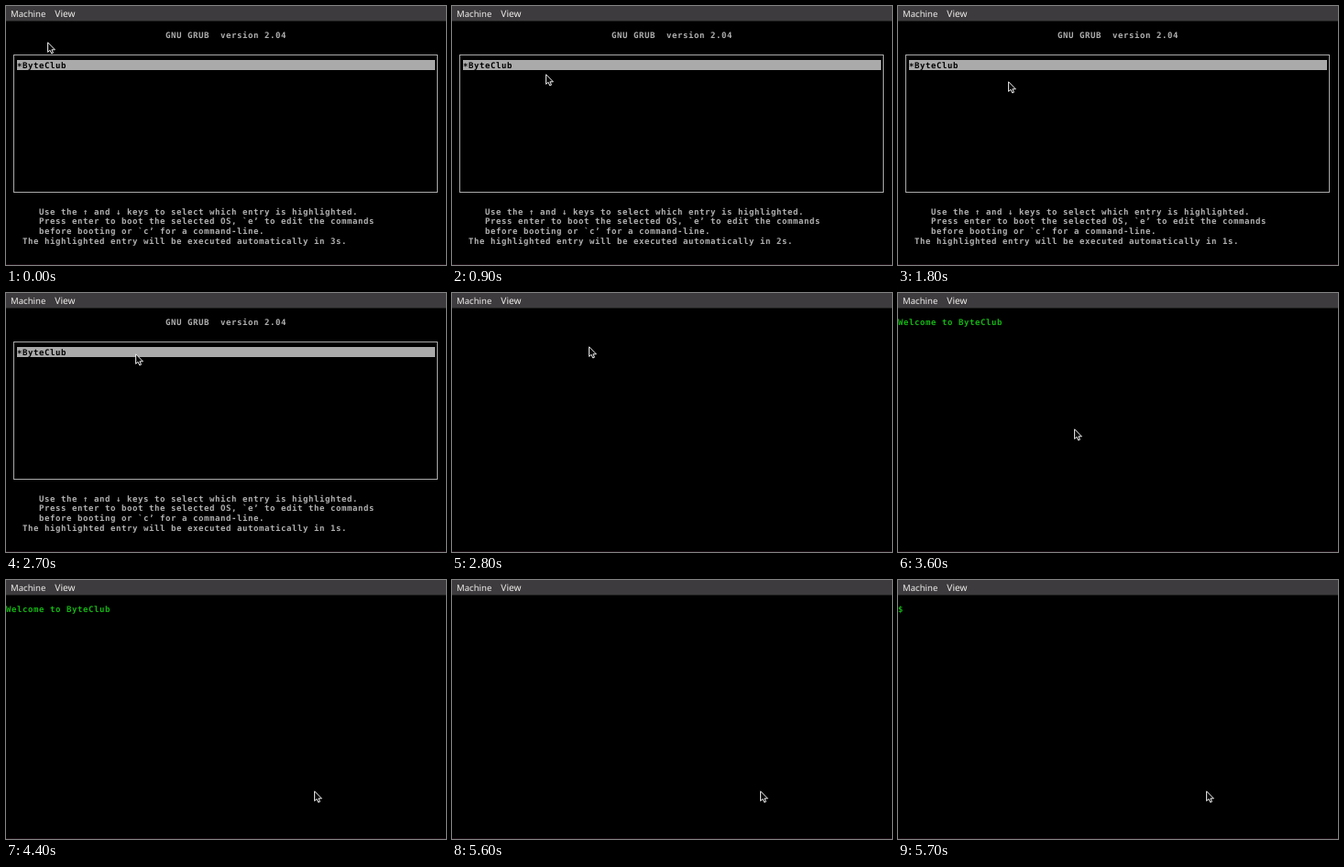
An HTML page that plays this animation: 480 px wide and 283 px high, repeating every 8000 ms.

```html
<!DOCTYPE html>
<html lang="en">
<head>
<meta charset="utf-8">
<title>Boot screen</title>
<style>
  html, body { margin: 0; width: 100%; height: 100%; overflow: hidden; background: #000; }
  svg { display: block; width: 480px; height: 283px; }
  text { white-space: pre; text-rendering: geometricPrecision; }

  .menu { font: 9.6px "Noto Sans", "Open Sans", sans-serif; fill: #f0eeec; }
  .menu .wide { font-size: 10.2px; }
  /* 80 columns of 6px */
  .term {
    font: bold 9px "DejaVu Sans Mono", "Liberation Mono", monospace;
    letter-spacing: .582px;
    fill: #b0b0b0;
  }
  .term .dark { fill: #000; }
  .term .green { fill: #14b414; }

  .grub, .count, .green, .pointer { animation: 8s step-end infinite; }
  .grub { animation-name: grub; }
  .three { animation-name: three; }
  .two { animation-name: two; }
  .one { animation-name: one; }
  .welcome { animation-name: welcome; }
  .prompt { animation-name: prompt; }
  .pointer { animation-name: pointer; }

  @keyframes grub { 0% { opacity: 1 } 35%, 100% { opacity: 0 } }
  @keyframes three { 0% { opacity: 1 } 10%, 100% { opacity: 0 } }
  @keyframes two { 0% { opacity: 0 } 10% { opacity: 1 } 22.5%, 100% { opacity: 0 } }
  @keyframes one { 0% { opacity: 0 } 22.5%, 100% { opacity: 1 } }
  @keyframes welcome { 0% { opacity: 0 } 37.5% { opacity: 1 } 70%, 100% { opacity: 0 } }
  @keyframes prompt { 0% { opacity: 0 } 71.25%, 100% { opacity: 1 } }

  /* The pointer is sampled every 100 ms (1.25%) while it moves. */
  @keyframes pointer {
    0% { transform: translate(45px, 39px) }
    10% { transform: translate(62px, 50px) }
    11.25% { transform: translate(102px, 74px) }
    12.5% { transform: translate(120px, 82px) }
    28.75% { transform: translate(122px, 81px) }
    30% { transform: translate(126px, 78px) }
    31.25% { transform: translate(131px, 75px) }
    32.5% { transform: translate(136px, 71px) }
    33.75% { transform: translate(141px, 66px) }
    35% { transform: translate(149px, 58px) }
    36.25% { transform: translate(131px, 52px) }
    37.5% { transform: translate(96px, 49px) }
    38.75% { transform: translate(70px, 49px) }
    40% { transform: translate(68px, 60px) }
    41.25% { transform: translate(86px, 86px) }
    42.5% { transform: translate(122px, 116px) }
    43.75% { transform: translate(166px, 140px) }
    45% { transform: translate(192px, 148px) }
    48.75% { transform: translate(262px, 190px) }
    50%, 100% { transform: translate(336px, 230px) }
  }
</style>
</head>
<body>
<svg viewBox="0 0 480 283">
  <rect width="480" height="283"/>
  <rect width="480" height="16.5" fill="#3d3b3d"/>
  <rect y="282" width="480" height="1" fill="#1a0c13"/>
  <g class="menu">
    <text x="5" y="12">Machine</text>
    <text class="wide" x="53.3" y="12">View</text>
  </g>

  <g class="term">
    <g class="grub">
      <text x="174" y="35.3">GNU GRUB&#160; version 2.04</text>
      <rect x="8.5" y="53.5" width="462" height="150" fill="none" stroke="#aaa"/>
      <rect x="12" y="59" width="456" height="11" fill="#aaa"/>
      <text class="dark" x="12" y="67.5"><tspan dy="1.6">*</tspan><tspan dy="-1.6">ByteClub</tspan></text>
      <text x="36" y="227.6">Use the ↑ and ↓ keys to select which entry is highlighted.</text>
      <text x="36" y="238.3">Press enter to boot the selected OS, `e’ to edit the commands</text>
      <text x="36" y="249">before booting or `c’ for a command-line.</text>
      <text x="18" y="259.7">The highlighted entry will be executed automatically in</text>
      <text class="count three" x="354" y="259.7">3</text>
      <text class="count two" x="354" y="259.7">2</text>
      <text class="count one" x="354" y="259.7">1</text>
      <text x="360" y="259.7">s.</text>
    </g>
    <text class="green welcome" x="0" y="35.3">Welcome to ByteClub</text>
    <text class="green prompt" x="0" y="35.3">$</text>
  </g>

  <g class="pointer">
    <path d="M.6 .8V11.4L3 9.3L4.8 13L6.5 12.2L4.9 8.8H8.4Z" fill="#0a0a0a" stroke="#f0f0f0"/>
  </g>
</svg>
</body>
</html>
```
